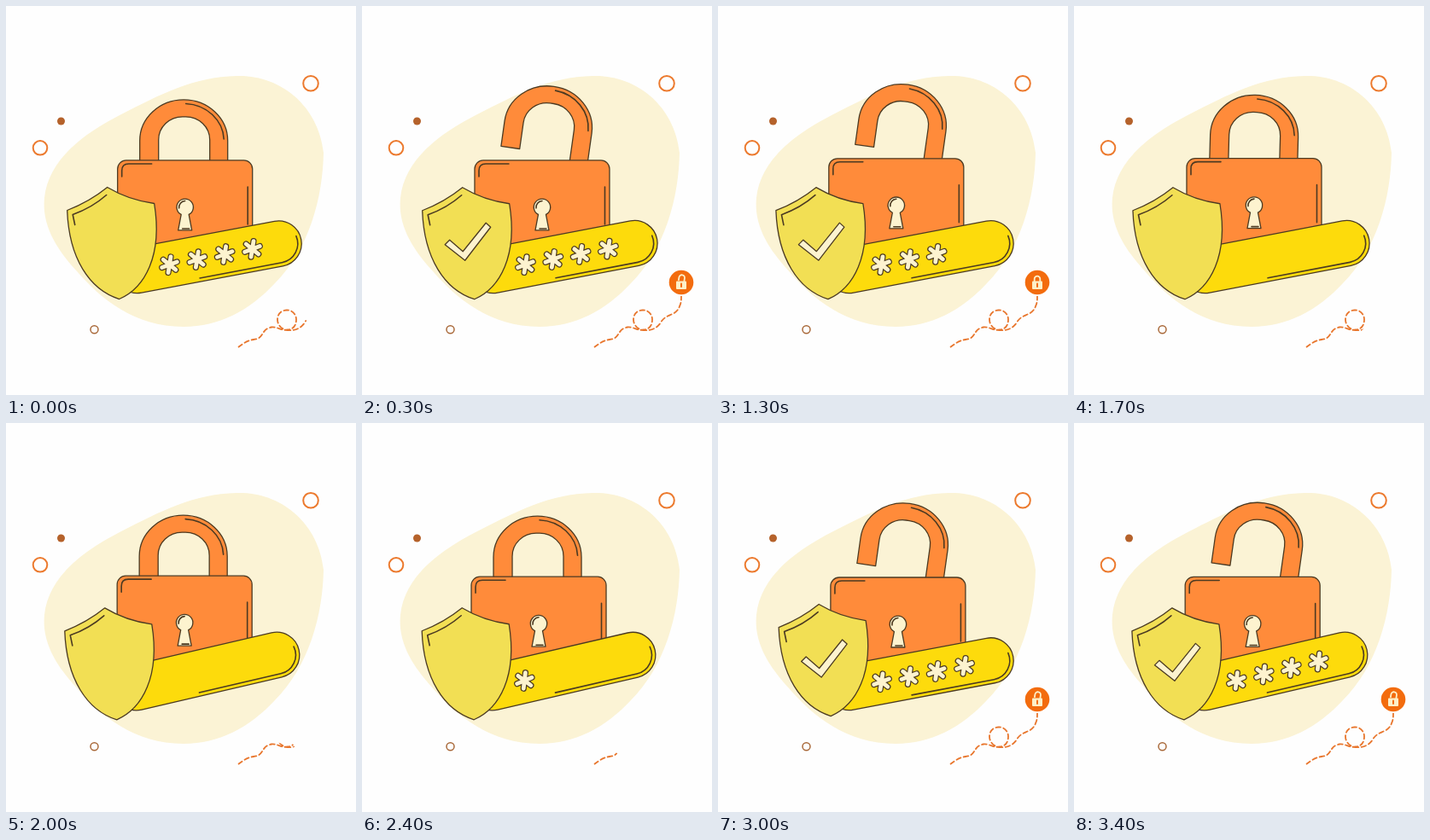
An HTML page for the animation above (3500 ms loop, 410 px wide and 456 px high).

```html
<!DOCTYPE html>
<html lang="en">
<head>
<meta charset="utf-8">
<title>Padlock</title>
<style>
  html, body { margin: 0; width: 100%; height: 100%; overflow: hidden; background: #fefefe; }
  svg { display: block; width: 410px; height: 456px; }
  .ink { stroke: #4b3a22; stroke-width: 1.3; stroke-linejoin: round; stroke-linecap: round; }
  .line { fill: none; stroke-width: 1.6; }
  .orange { fill: #ff8b3a; }
  .cream { fill: #fdf3cf; }
</style>
</head>
<body>
<svg viewBox="0 0 410 456">
  <defs>
    <path id="route" d="M272 400C280 394 284 392 290 391C303 390 298 379 311 376.5C319 376 322 381 330 379.5C337 379 340 374 340 367.5C340 361 335 356.5 329 356.5C322.5 356.5 318 361 318 367.5C318 374 323 379 329 380C340 381 346 377 350 371C356 360 368 364 372 352C374 348 374 344 374 340"/>
    <mask id="reveal" maskUnits="userSpaceOnUse" x="250" y="330" width="150" height="90">
      <path id="revealLine" fill="none" stroke="#fff" stroke-width="6"/>
    </mask>
    <g id="star" stroke-linecap="round" fill="none">
      <path id="arms" stroke="#4b3a22" stroke-width="7.2"/>
      <path id="armsTop" stroke="#fdf3cf" stroke-width="4.8"/>
    </g>
  </defs>

  <path fill="#fbf3d5" d="M270 82C320 80 366 116 372 172C371 225 355 285 315 325C285 357 250 376 208 376C150 376 110 342 84 312C57 283 42 255 45 225C50 180 90 150 135 127C180 104 220 83 270 82Z"/>
  <g fill="none" stroke="#ec7a2e" stroke-width="2">
    <circle cx="357" cy="90.8" r="8.8"/>
    <circle cx="40" cy="166.3" r="8.3"/>
    <circle cx="103.5" cy="379.3" r="4.5" stroke="#a9693a" stroke-width="1.5"/>
  </g>
  <circle cx="64.5" cy="135" r="4.5" fill="#b5622b"/>

  <g mask="url(#reveal)">
    <use href="#route" fill="none" stroke="#e8762d" stroke-width="1.8" stroke-dasharray="5.5 3.5" stroke-linecap="round"/>
  </g>
  <g id="badge">
    <circle r="14.3" fill="#f36c0e"/>
    <path id="miniShackle" fill="none" stroke="#fdf0c8" stroke-width="1.8" d="M-3.3 0V-4A3.3 3.3 0 0 1 3.3 -4V0"/>
    <rect x="-6" y="-1.5" width="12" height="9.5" rx="1" fill="#fdf0c8"/>
    <path d="M0 1.5V5" stroke="#f36c0e" stroke-width="2" stroke-linecap="round"/>
  </g>

  <g id="lock">
    <g id="shackle">
      <path class="ink orange" d="M157 188V158A51.5 48 0 0 1 260 158V212H239V157A28 27 0 0 0 211 130H207A28 27 0 0 0 179 157V188Z"/>
      <path class="ink line" d="M211 114.5A47 43.5 0 0 1 255.5 156"/>
    </g>
    <rect class="ink orange" x="131" y="181" width="158" height="112" rx="10"/>
    <path class="ink line" d="M136 200V193Q136 185 144 185H171M283.5 212V256"/>
    <g transform="translate(1 0)">
      <path class="ink cream" d="M204.5 244.5A9.7 9.7 0 1 1 213.5 244.5L217 263H201Z"/>
      <path class="ink line" d="M202 237A7.5 7.5 0 0 1 209 228.5M206 261H214"/>
    </g>
  </g>

  <g id="pill">
    <rect class="ink" fill="#fddb0c" x="-33" y="-26.7" width="222" height="53.4" rx="26.7"/>
    <path class="ink line" d="M64 22.5H162A22.5 22.5 0 0 0 184 -5"/>
    <g id="stars"></g>
  </g>

  <g id="shield">
    <path class="ink" fill="#f2df54" d="M118 214Q97 231 71 241C73 297 97 334 132 345C162 332 183 294 173 233Q143 229 118 214Z"/>
    <path class="ink line" d="M80 258L77.5 246Q100 238 117 223"/>
    <path id="check" class="ink cream" d="M-24.5 3L-19 -2.5L-3.5 11L23.5 -22.5L29 -17.5L-1 21.5Z"/>
  </g>
</svg>

<script>
const LOOP = 3500, CYCLE = 2800, STEP = 100;
const $ = id => document.getElementById(id);
const clamp = u => Math.min(1, Math.max(0, u));

// Eased rise from 0 to 1.
function ramp(t, from, to) {
  const u = clamp((t - from) / (to - from));
  return u * u * (3 - 2 * u);
}
// Cosine with its crest at the given time.
const wave = (t, crest, period) => Math.cos(2 * Math.PI * (t - crest) / period);
// The same wave, lingering at both ends.
function sway(t) {
  const w = wave(t, 84, CYCLE / 2);
  return 1.08 * w / Math.sqrt(w * w + .15);
}
// The dashed route draws itself, rests, then shrinks back.
function routeShare(t) {
  const later = t < 1450 ? t + CYCLE : t;
  return clamp(Math.max(1 - (later - 1450) / 860, (later - 2310) / 610));
}

const armPath = [0, 1, 2].map(i => {
  const a = Math.PI * (i / 3 + .61), x = 9.4 * Math.cos(a), y = 9.4 * Math.sin(a);
  return `M${-x} ${-y}L${x} ${y}`;
}).join('');
$('arms').setAttribute('d', armPath);
$('armsTop').setAttribute('d', armPath);

const stars = Array.from({ length: 4 }, () => {
  const star = document.createElementNS('http://www.w3.org/2000/svg', 'use');
  star.setAttribute('href', '#star');
  return $('stars').appendChild(star);
});

const reveal = $('revealLine');
reveal.setAttribute('d', $('route').getAttribute('d'));
const routeLength = reveal.getTotalLength();

const place = (el, transform) => el.setAttribute('transform', transform);
function grow(el, x, y, scale) {
  el.style.display = scale < .01 ? 'none' : '';
  place(el, `translate(${x} ${y}) scale(${scale})`);
}

function draw(ms) {
  const t = ms % CYCLE;
  const bob = sway(t), tilt = 1.25 * (bob - 1);
  const open = ramp(t, 0, 200) - ramp(t, 1450, 1800);

  place($('lock'), `translate(${2 * wave(t, 270, CYCLE / 2) - 1} ${-1.2 - 1.2 * wave(t, 1550, CYCLE)})`);
  place($('shackle'), `translate(${5 * open} ${-10.5 * open}) rotate(${8 * open} 250 181)`);
  place($('pill'), `translate(${160 + tilt * .4} 308.7) rotate(${tilt - 10.7})`);
  place($('shield'), `translate(${.8 * bob - 1.9 + 2 * wave(t, 2600, CYCLE)} ${.75 - 2.25 * bob})`);
  grow($('check'), 122, 278, ramp(t, 0, 200) - ramp(t, 1400, 1650));
  grow($('badge'), 374, 324, ramp(t, 0, 200) - ramp(t, 1350, 1500));
  place($('miniShackle'), t < 650 ? 'translate(0 -1) rotate(9 3.3 0)' : '');

  stars.forEach((star, i) => {
    const out = 1540 - 120 * i, back = 2280 + 120 * i;
    const size = 1 - ramp(t, out, out + 120) + ramp(t, back, back + 120);
    grow(star, 32 + 32.9 * i, .5, size);
  });

  reveal.setAttribute('stroke-dasharray', `${routeShare(t) * routeLength} ${routeLength + 10}`);
}

function frame() {
  const now = performance.now() % LOOP;
  draw(Math.floor(now / STEP) * STEP);
  requestAnimationFrame(frame);
}
frame();
</script>
</body>
</html>
```
